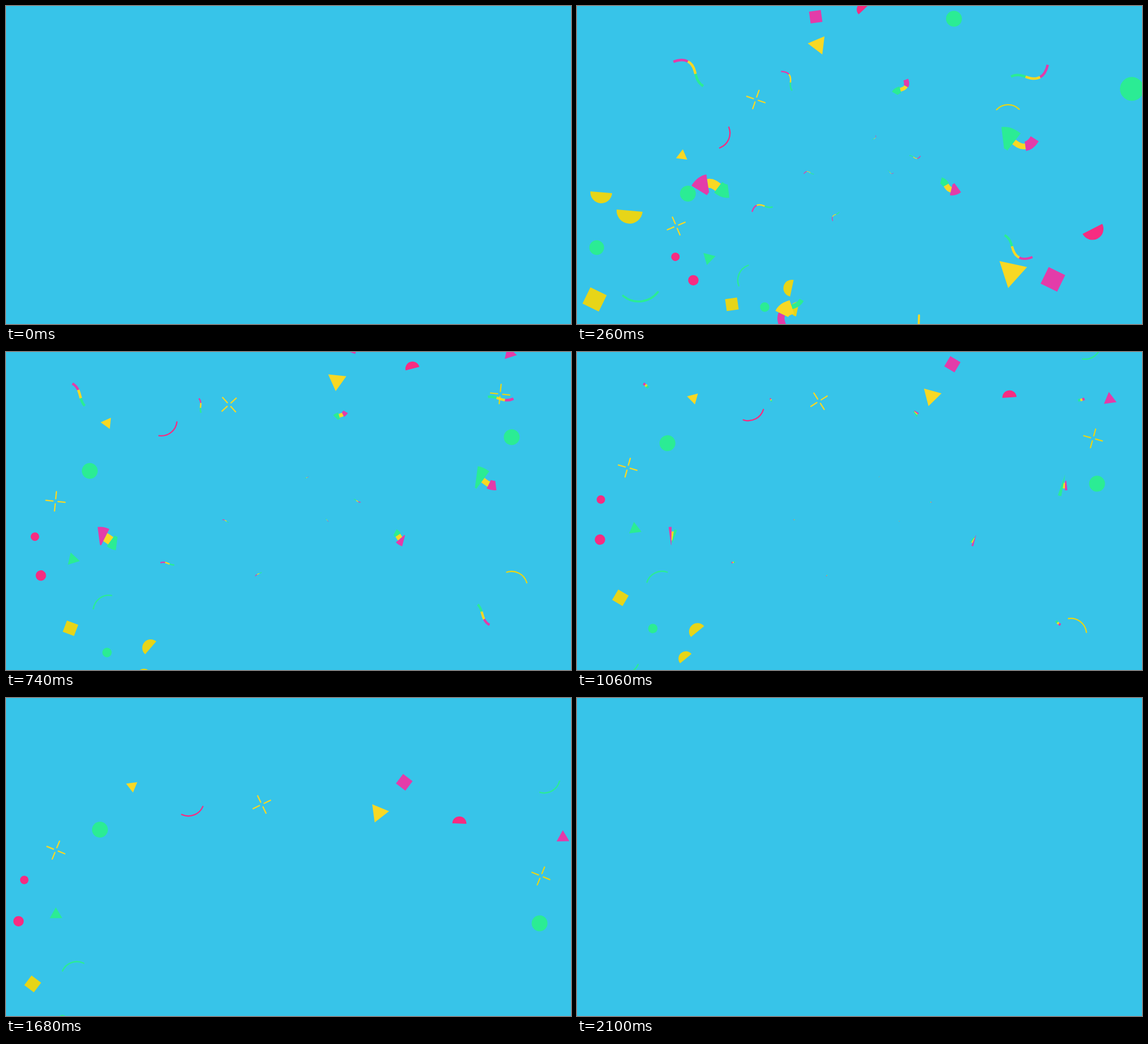
Write an HTML page with a canvas that moves like this. It is 998 px wide and 561 px high and loops after 2.68 s.

```html
<!DOCTYPE html>
<html lang="en">
<head>
<meta charset="utf-8">
<title>Confetti burst</title>
<style>
html, body { margin: 0; width: 100%; height: 100%; overflow: hidden; background: #37c4e9; }
canvas { display: block; }
</style>
</head>
<body>
<canvas id="stage" width="998" height="561"></canvas>
<script>
const ctx = document.getElementById('stage').getContext('2d');
const W = 998, H = 561;
const BG = '#37c4e9', YELLOW = '#f8d824', GOLD = '#e7d518';
const GREEN = '#2bec94', PINK = '#e33ca9', ROSE = '#f72c81';
const LOOP = 2680, STEP = 20, END = 2100;
const RAD = Math.PI / 180;
const PIVOT = { x: 365, y: 280 };

const clamp = v => Math.max(0, Math.min(1, v));

// Shapes are drawn around the origin with size s.
const shapes = {
  circle(s) { ctx.arc(0, 0, s, 0, 7); ctx.fill(); },
  half(s) { ctx.arc(0, 0, s, Math.PI, 2 * Math.PI); ctx.fill(); },
  square(s) { ctx.rect(-s / 2, -s / 2, s, s); ctx.fill(); },
  triangle(s) {
    for (let a = 0; a < 360; a += 120) ctx.lineTo(s * Math.cos(a * RAD), s * Math.sin(a * RAD));
    ctx.fill();
  },
  cross(s) {
    for (let a = 0; a < 360; a += 90) {
      const c = s * Math.cos(a * RAD), d = s * Math.sin(a * RAD);
      ctx.moveTo(c * 0.27, d * 0.27);
      ctx.lineTo(c, d);
    }
    ctx.lineWidth = s * 0.135;
    ctx.stroke();
  },
  // s is the chord; the bow hangs below it.
  arc(s) {
    const r = s * 0.695;
    ctx.arc(0, -r * 0.695, r, 44 * RAD, 136 * RAD);
    ctx.lineWidth = s * 0.058;
    ctx.stroke();
  }
};

// Each piece has one resting place; the whole cloud spreads, turns and falls.
const pieces = [];
const far = (kind, color, size, x, y, turn = 0) =>
  pieces.push({ kind, color, size, x: x - PIVOT.x, y: y - PIVOT.y, turn });
// Near pieces keep flying outwards.
const near = (...args) => { far(...args); pieces[pieces.length - 1].near = true; };

far('circle', ROSE, 7.5, 41, 244);
far('circle', ROSE, 9.2, 34, 315);
far('circle', GREEN, 14, 167, 153);
far('circle', GREEN, 8.3, 116, 480);
far('circle', GREEN, 14, 925, 283);
far('triangle', GREEN, 12.8, 97.5, 301, 27);
far('triangle', YELLOW, 11.5, 219, 76.5, 80);
far('triangle', YELLOW, 18.6, 642.3, 105, 110);
far('triangle', PINK, 13, 959, 135, 27);
far('square', GOLD, 21.3, 62.5, 421, 35);
far('square', PINK, 21, 684, 51.5, 35);
far('half', GOLD, 15, 195, 491.5, -35);
far('half', GOLD, 13, 170.5, 538, -35);
far('half', ROSE, 12.5, 781, 118);
far('cross', YELLOW, 17, 442, 99, 62);
far('cross', YELLOW, 17, 93, 191, 20);
far('cross', GOLD, 17, 924, 202, 20);
far('arc', ROSE, 40, 323.5, 114, -23);
far('arc', GREEN, 40, 130.5, 389.5, 158);
far('arc', GREEN, 40, 933, 49, -32);
far('arc', GREEN, 40, 65.5, 547, -15);
far('arc', GOLD, 40, 871, 532, 222);

near('square', GOLD, 32, -172, 186, 69);
near('square', PINK, 32.5, 671, 906, 69);
near('triangle', YELLOW, 28.8, 610, 825, 145);
near('circle', GREEN, 13, -83, 98);
near('circle', GREEN, 21, 1124, 700);
near('half', GOLD, 19.3, 16, 8, 228);
near('half', GOLD, 23, 36, 87, 228);
near('half', ROSE, 19.5, 824, 882, 196);
near('arc', GREEN, 62, -82, 252, 37);
near('cross', YELLOW, 27, 349, 775, 45);

function drawPieces(t) {
  const fall = 1.57e-10 * Math.pow(Math.max(0, t - 735), 4);
  const spread = 0.995 * (1 - Math.exp(-t / 196)) + 0.0003 * fall;
  const turn = 2.6 - 45.6 * Math.pow(Math.max(0, 2060 - t) / 1800, 3.2);
  ctx.save();
  ctx.translate(PIVOT.x, PIVOT.y + 30 - 0.038 * t + fall);
  ctx.rotate(turn * RAD);
  ctx.lineCap = 'round';
  for (const p of pieces) {
    const k = p.near ? spread * t / 260 : spread;
    ctx.save();
    ctx.translate(p.x * k, p.y * k);
    ctx.rotate(p.turn * RAD);
    ctx.fillStyle = ctx.strokeStyle = p.color;
    ctx.beginPath();
    shapes[p.kind](p.size);
    ctx.restore();
  }
  ctx.restore();
}

// All ribbons are one S curve, turned and scaled about the stage centre.
const WAVE = 'M0 0C20 -3 27 17 44 17C55 17 61.5 11 68 0' +
  'C74.5 -11 81 -17 92 -17C109 -17 116 3 136 0';
const REACH = 443, TWIST = 188.5;
const wave = new Path2D(WAVE);
const waveEl = document.createElementNS('http://www.w3.org/2000/svg', 'path');
waveEl.setAttribute('d', WAVE);
const waveLen = waveEl.getTotalLength();

const ribbons = [];
const ribbon = (bearing, reach, widths = [4.5, 4.5, 4.5]) => ribbons.push({ bearing, reach, widths });
// A fan is a wide ribbon with a small thin one on the same ray.
const fan = (bearing, reach, ...widths) => {
  ribbon(bearing, reach, widths);
  ribbon(bearing, reach * 0.348);
};

ribbon(210.5, 443);
ribbon(231.5, 254);
ribbon(333.5, 444);
ribbon(29.5, 408);
ribbon(158, 244);
fan(172.5, 338, 42, 21, 31);
fan(-7, 369, 20, 12, 46);
fan(14.5, 210, 42, 21, 25);
fan(300, 202, 20, 15, 26);
fan(117, 371, 15, 30, 10);

function drawRibbon({ bearing, reach, widths }, from, to) {
  const part = (to - from) / 3, gap = 2 * waveLen;
  ctx.save();
  ctx.translate(W / 2, H / 2);
  ctx.rotate(bearing * RAD);
  ctx.scale(reach / REACH, reach / REACH);
  ctx.translate(REACH, 0);
  ctx.rotate(TWIST * RAD);
  [PINK, YELLOW, GREEN].forEach((color, i) => {
    ctx.strokeStyle = color;
    ctx.lineWidth = widths[i];
    ctx.setLineDash([part, gap]);
    ctx.lineDashOffset = part + gap - (from + i * part);
    ctx.stroke(wave);
  });
  ctx.restore();
}

function drawRibbons(t) {
  const head = (1 - Math.cos(Math.PI * clamp(t / 520))) / 2;
  const rest = Math.pow(1 - clamp((t - 260) / 1230), 2.5);
  const from = waveLen * (1 - head), to = waveLen * rest;
  if (to - from > 0.05) for (const r of ribbons) drawRibbon(r, from, to);
}

function draw(t) {
  ctx.fillStyle = BG;
  ctx.fillRect(0, 0, W, H);
  if (t < STEP || t >= END) return;
  drawPieces(t);
  drawRibbons(t);
}

const start = performance.now();
function tick() {
  const t = (performance.now() - start) % LOOP;
  draw(Math.floor(t / STEP) * STEP);
  requestAnimationFrame(tick);
}
tick();
</script>
</body>
</html>
```
